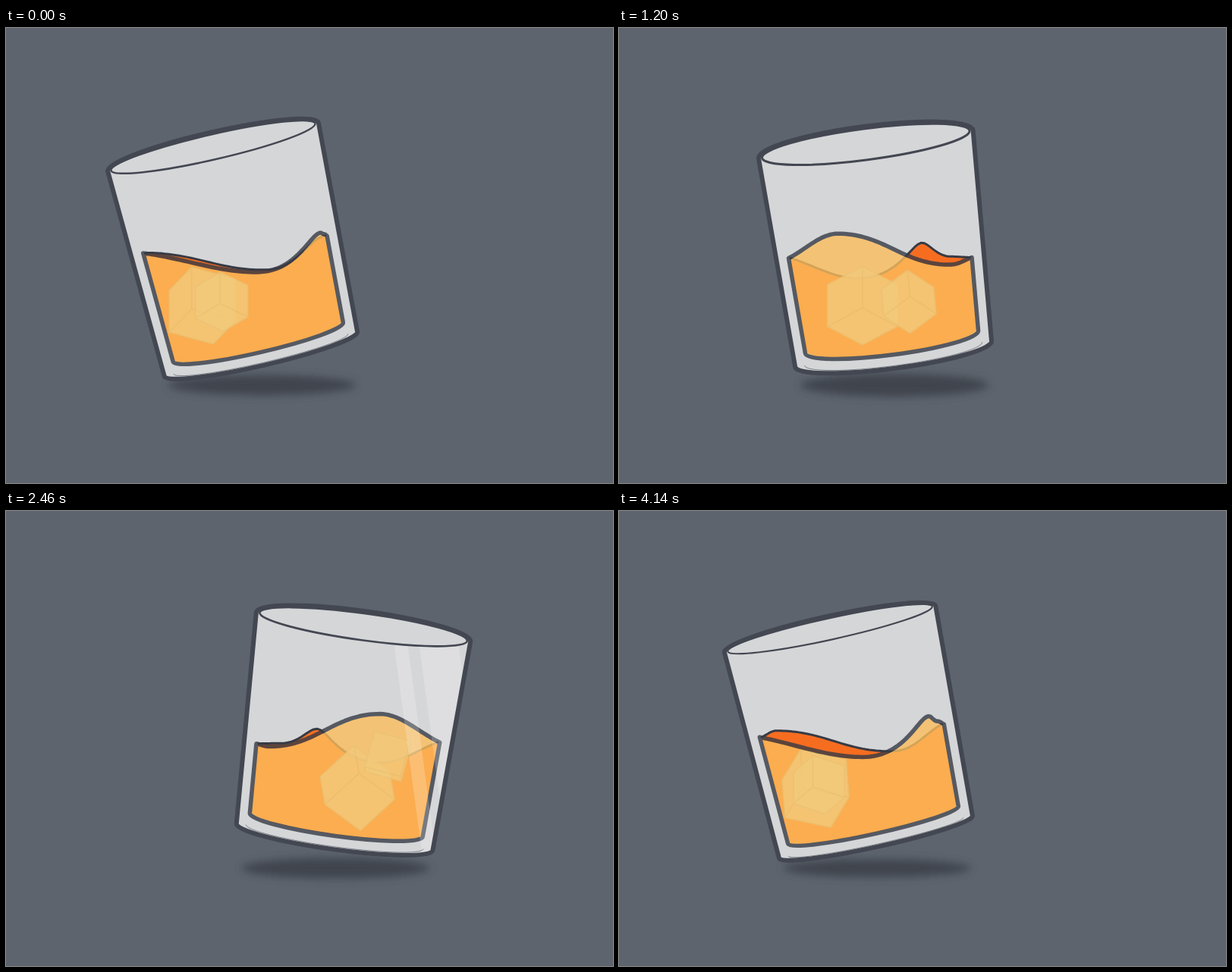
Recreate the animation shown at these times as an HTML page. Size 800 by 600 pixels, loop 4200 ms.

```html
<!DOCTYPE html>
<html lang="en">
<head>
<meta charset="utf-8">
<title>Swirling glass</title>
<style>
  html, body { margin: 0; width: 100%; height: 100%; overflow: hidden; background: #5d646e; }
  svg { display: block; width: 100vw; height: 100vh; }
  path, ellipse { stroke-linejoin: round; stroke-linecap: round; }
</style>
</head>
<body>
<svg viewBox="0 0 800 600">
  <defs>
    <filter id="blur" x="-20%" y="-100%" width="140%" height="300%"><feGaussianBlur stdDeviation="5.2"/></filter>
    <clipPath id="inside"><path id="clip"/></clipPath>
  </defs>
  <ellipse id="shadow" cy="471" rx="124" fill="#40444d" filter="url(#blur)"/>
  <path id="glass" fill="#d5d6d8"/>
  <path id="back" fill="#f76d20"/>
  <path id="backEdge" fill="none" stroke="#363b45" stroke-width="3"/>
  <g fill="#cdf6f6" stroke="#9fd3d0" stroke-width="1.5">
    <path id="bigIce" opacity=".82"/>
    <path id="smallIce" opacity=".82"/>
  </g>
  <path id="front" fill="#fcbe5c" stroke="#363b45" stroke-width="5.5" opacity=".8"/>
  <path clip-path="url(#inside)" fill="#fff" opacity=".2"
        d="M510 165h18l40 300h-18zM543 165h52l40 300h-52z"/>
  <path id="floor" fill="none" stroke="#434751" stroke-width=".6"/>
  <path id="outline" fill="none" stroke="#434751" stroke-width="6"/>
  <ellipse id="rim" rx="138" fill="none" stroke="#434751"/>
</svg>
<script>
const CYCLE = 1050, TAU = Math.PI * 2;
const el = Object.fromEntries([...document.querySelectorAll('[id]')].map(n => [n.id, n]));
const set = (id, attrs) => {
  for (const name in attrs) el[id].setAttribute(name, attrs[name]);
};
const mix = (a, b, f) => a + (b - a) * f;
const clamp01 = f => Math.min(1, Math.max(0, f));
const pt = p => p.map(n => n.toFixed(2)).join(' ');
const line = points => points.map(pt).join('L');

// Nodes are [x, y, handle before, handle after]; tangents are level,
// except at a zero handle, where the curve leaves towards its neighbour.
function heightAt(nodes, x) {
  let i = 0;
  while (i < nodes.length - 2 && x > nodes[i + 1][0]) i++;
  const [x0, y0, , out] = nodes[i], [x1, y1, into] = nodes[i + 1];
  const goal = (x - x0) / (x1 - x0);
  const outX = out || .35, inX = 1 - (into || .35);
  let lo = 0, hi = 1;
  for (let n = 0; n < 18; n++) {
    const m = (lo + hi) / 2, w = 1 - m;
    const at = 3 * w * w * m * outX + 3 * w * m * m * inX + m ** 3;
    if (at < goal) lo = m; else hi = m;
  }
  const a = out ? y0 : mix(y0, y1, .35), b = into ? y1 : mix(y1, y0, .35);
  const w = 1 - lo;
  return w ** 3 * y0 + 3 * w * w * lo * a + 3 * w * lo * lo * b + lo ** 3 * y1;
}

function waveShapes(crest) {
  const k = Math.abs(crest), lean = Math.min(1, k / .25);
  const inner = 310 - 14 * k, outer = 312 - 44 * k * k, top = 299 - 34 * k;
  return {
    inner, outer,
    peaked: [
      [-1, inner, 0, 0],
      [k - .72, mix(320, 337 - 15 * k, lean), .35, .65],
      [k, top, .16, .25],
      [k + .6 * (1 - k), mix(outer + 9 * (1 - lean), top, .6 * k ** 3), .5, .3],
      [1, outer, 0, 0]
    ],
    broad: [
      [-1, inner, 0, 0],
      [-k, 263 + 38 * k * k, .35, .42],
      [Math.min(.85, 1.15 - .85 * k), 306 + 13 * k, .42, .45],
      [1, outer, 0, 0]
    ]
  };
}

// Cube attitude over one cycle: phase, yaw, pitch, roll.
const attitudes = [
  [0, 27, 32, 0], [.9, 45, 32, 0], [2.15, 52, 55, -10], [2.87, 88, 6, 16],
  [4.2, 100, 35, 0], [5.57, 112, 48, -9], [TAU, 117, 32, 0]
];

function cubePath(cx, cy, size, phase) {
  const p = phase % TAU;
  const i = attitudes.findIndex((a, n) => n && p <= a[0]) - 1;
  const from = attitudes[i], to = attitudes[i + 1];
  const f = (p - from[0]) / (to[0] - from[0]), ease = f * f * (3 - 2 * f);
  // A quarter turn leaves a cube looking the same.
  const [, yaw, pitch, roll] = from.map((v, n) => mix(v, to[n], ease) % 90 * Math.PI / 180);
  const turn = (x, y) => [
    size * (x * Math.cos(roll) - y * Math.sin(roll)),
    size * (x * Math.sin(roll) + y * Math.cos(roll))
  ];
  const s = Math.sin(pitch);
  const X = turn(Math.cos(yaw), Math.sin(yaw) * s);
  const Y = turn(0, -Math.cos(pitch));
  const Z = turn(-Math.sin(yaw), Math.cos(yaw) * s);
  const add = (...vs) => vs.reduce((a, b) => [a[0] + b[0], a[1] + b[1]]);
  const near = [cx - (X[0] + Y[0] + Z[0]) / 2, cy - (X[1] + Y[1] + Z[1]) / 2];
  const face = (a, b) => 'M' + line([near, add(near, a), add(near, a, b), add(near, b)]) + 'Z';
  return face(X, Y) + face(Y, Z) + face(Z, X);
}

function draw(time) {
  const phase = (time % CYCLE) / CYCLE * TAU;
  const swing = phase + .054;
  const baseX = 396.6 - 60.8 * Math.cos(swing), baseY = 430;
  const tilt = -13 * Math.cos(swing), angle = tilt * Math.PI / 180;
  const cos = Math.cos(angle), sin = Math.sin(angle);
  const place = (u, v) => [baseX + u * cos - v * sin, baseY + u * sin + v * cos];
  const ry = 13.8 + 6.5 * Math.sin(phase) + 2.7 * Math.cos(phase);
  const height = 281 - (ry - 14) * .3;
  const arc = (rx, r, sweep, end) => `A${rx} ${r} ${tilt} 0 ${sweep} ${pt(end)}`;

  // Glass
  const topLeft = place(-142.5, -height), topRight = place(142.5, -height);
  const bottom = 'L' + pt(place(130.5, 0)) + arc(130.5, ry * .92, 1, place(-130.5, 0)) + 'Z';
  const shell = 'M' + pt(topLeft) + arc(142.5, ry + 3, 1, topRight) + bottom;
  set('glass', { d: shell });
  set('outline', { d: shell });
  set('clip', { d: 'M' + pt(topLeft) + arc(142.5, ry, 0, topRight) + bottom });
  set('floor', { d: 'M' + pt(place(118, 0)) + arc(118, ry * .92 - 3.5, 1, place(-118, 0)) });
  const [rimX, rimY] = place(0, -height);
  set('rim', {
    cx: rimX, cy: rimY, ry, 'stroke-width': ry * .15,
    transform: `rotate(${tilt} ${rimX} ${rimY})`
  });
  set('shadow', { cx: baseX + 1.5, ry: 5 + ry * .5 });

  // Liquid
  const crest = .03 + .82 * Math.cos(phase) + .08 * Math.cos(3 * phase);
  const side = crest < 0 ? -1 : 1;
  const shapes = waveShapes(crest);
  const inFront = clamp01(.5 - 4 * Math.sin(phase - .08));
  const [leftY, rightY] = side > 0 ? [shapes.inner, shapes.outer] : [shapes.outer, shapes.inner];
  const wallX = (dir, y, inset) => {
    const a = place(dir * (115 - inset), -16), b = place(dir * (120.5 - inset), -145);
    return mix(a[0], b[0], (y - a[1]) / (b[1] - a[1]));
  };
  const surface = (peakShare, inset) => {
    const left = wallX(-1, leftY, inset), right = wallX(1, rightY, inset);
    return Array.from({ length: 81 }, (_, i) => {
      const x = -Math.cos(i / 80 * Math.PI);
      const q = x * side;
      const y = mix(heightAt(shapes.broad, q), heightAt(shapes.peaked, q), peakShare);
      return [mix(left, right, (x + 1) / 2), y];
    });
  };
  const body = (top, inset) => 'M' + line(top) + 'L' + pt(place(115 - inset, -16 - inset)) +
    arc(115 - inset, ry * .82, 1, place(inset - 115, -16 - inset)) + 'Z';
  const backTop = surface(1 - inFront, 2.5);
  set('back', { d: body(backTop, 2.5) });
  set('backEdge', { d: 'M' + line(backTop) });
  set('front', { d: body(surface(inFront, 0), 0) });

  // Ice
  const rightward = a => Math.max(0, -Math.cos(a));
  const late = phase + .65;
  set('bigIce', {
    d: cubePath(379 - 122 * Math.cos(phase + .17), 366 - 25 * rightward(phase) ** 6, 65, phase)
  });
  set('smallIce', {
    d: cubePath(384 - 126 * Math.cos(late), 361 - 42 * rightward(late) ** 2, 49, late)
  });
}

const start = performance.now();
function tick() {
  draw((performance.now() - start) % (CYCLE * 4));
  requestAnimationFrame(tick);
}
tick();
</script>
</body>
</html>
```
